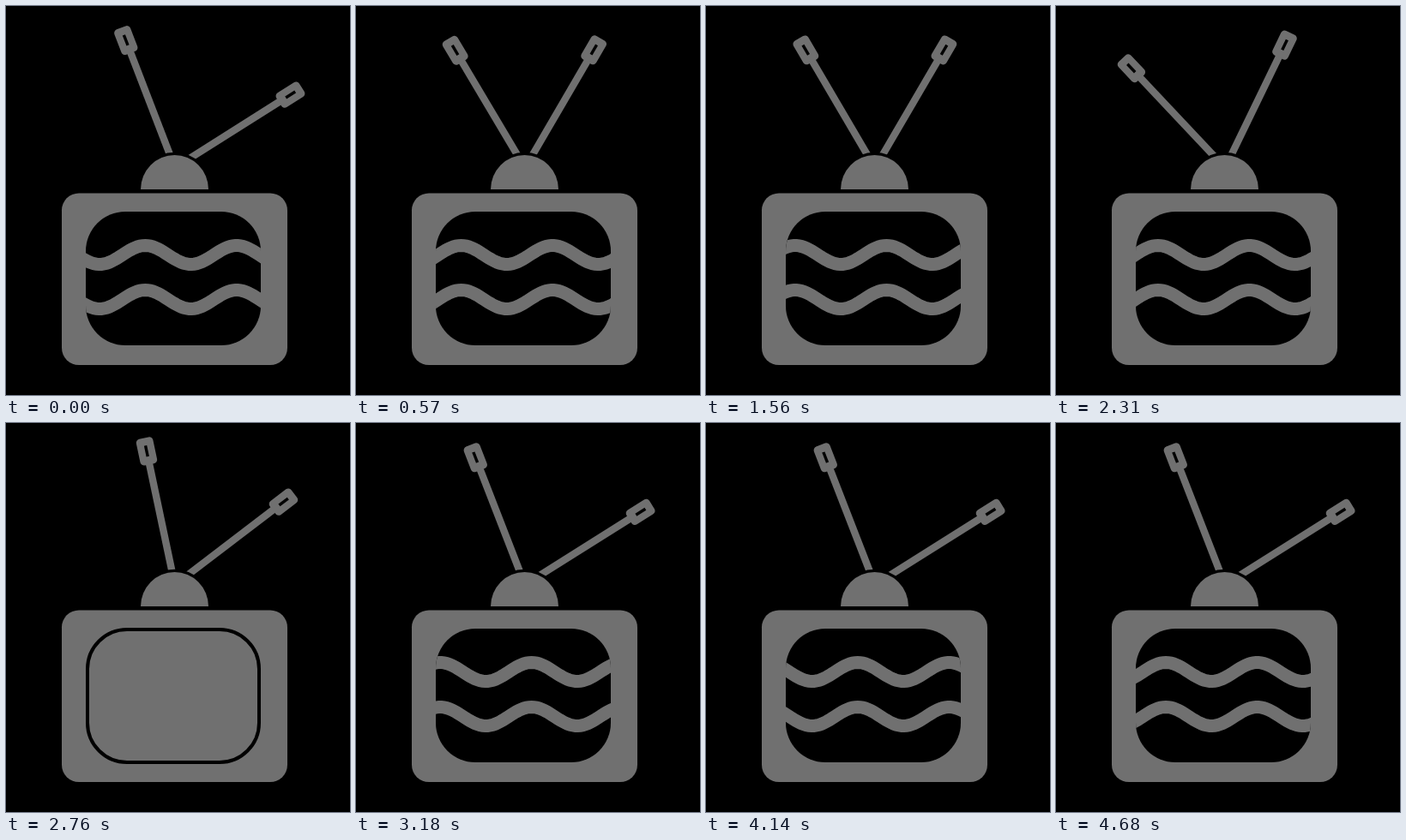
An HTML page for the animation above (4710 ms loop, 401 by 454 pixels).

```html
<!DOCTYPE html>
<html lang="en">
<head>
<meta charset="utf-8">
<title>Television</title>
<style>
  html, body { margin: 0; height: 100%; overflow: hidden; background: #000; }
  svg { display: block; width: 401px; height: 454px; }
</style>
</head>
<body>
<svg viewBox="0 0 401 454" fill="#707070">
  <defs>
    <clipPath id="glass"><rect x="93" y="240" width="204" height="156" rx="46"/></clipPath>
    <g id="rod">
      <rect x="-4.2" y="-148" width="8.4" height="148"/>
      <rect x="-10" y="-174.5" width="20" height="31.5" rx="4.5"/>
      <rect x="-1.7" y="-165.5" width="3.4" height="13" fill="#000"/>
    </g>
  </defs>
  <use id="left" href="#rod"/>
  <use id="right" href="#rod"/>
  <circle cx="196.5" cy="213.5" r="42.8" fill="#000"/>
  <path d="M157 214a39.5 40 0 0 1 79 0z"/>
  <rect x="65" y="218.5" width="263" height="200.5" rx="20"/>
  <g id="picture">
    <rect x="93" y="240" width="204" height="156" rx="46" fill="#000"/>
    <g clip-path="url(#glass)">
      <g id="waves" fill="none" stroke="#707070" stroke-width="15">
        <path id="wave"/>
        <use href="#wave" y="52"/>
      </g>
    </g>
  </g>
  <rect id="blank" x="95" y="241" width="200" height="155" rx="46" fill="none" stroke="#000" stroke-width="4"/>
</svg>
<script>
  const $ = id => document.getElementById(id);
  const LOOP = 4710, LENGTH = 106.5, PERIOD = 350.4;
  const CREST = 55.5, RESTART = 2340;

  // time, left angle, right angle
  const SWING = [
    [0, -21.2, 57.8],
    [85, -4.5, 48],
    [365, -60, 20],
    [573, -30.4, 30.3],
    [2212, -30.4, 30.3],
    [2440, -60, 20],
    [2722, -4.5, 48.5],
    [2810, -21.2, 57.8],
    [LOOP, -21.2, 57.8]
  ];
  const BLANKS = [[90, 450], [RESTART, 2810]];

  // Crest at x = 0
  let d = "";
  for (let x = -LENGTH; x <= 401; x += 3) {
    const y = 290.5 - 11 * Math.cos(2 * Math.PI * x / LENGTH);
    d += (d ? "L" : "M") + x + " " + y.toFixed(2);
  }
  $("wave").setAttribute("d", d);

  function angles(t) {
    const i = SWING.findIndex(step => step[0] > t);
    const a = SWING[i - 1], b = SWING[i];
    const k = (t - a[0]) / (b[0] - a[0]);
    return [1, 2].map(n => a[n] + (b[n] - a[n]) * k);
  }

  function draw(t) {
    const [left, right] = angles(t);
    $("left").setAttribute("transform", `translate(196.7 188.3) rotate(${left})`);
    $("right").setAttribute("transform", `translate(197.3 188.5) rotate(${right})`);

    const run = t < RESTART ? t : t - RESTART;
    const shift = (CREST + run / PERIOD * LENGTH) % LENGTH;
    $("waves").setAttribute("transform", `translate(${shift} 0)`);

    const blank = BLANKS.some(([from, to]) => t >= from && t < to);
    $("picture").setAttribute("visibility", blank ? "hidden" : "visible");
    $("blank").setAttribute("visibility", blank ? "visible" : "hidden");
  }

  const start = performance.now();
  function tick() {
    draw((performance.now() - start) % LOOP);
    requestAnimationFrame(tick);
  }
  tick();
</script>
</body>
</html>
```
